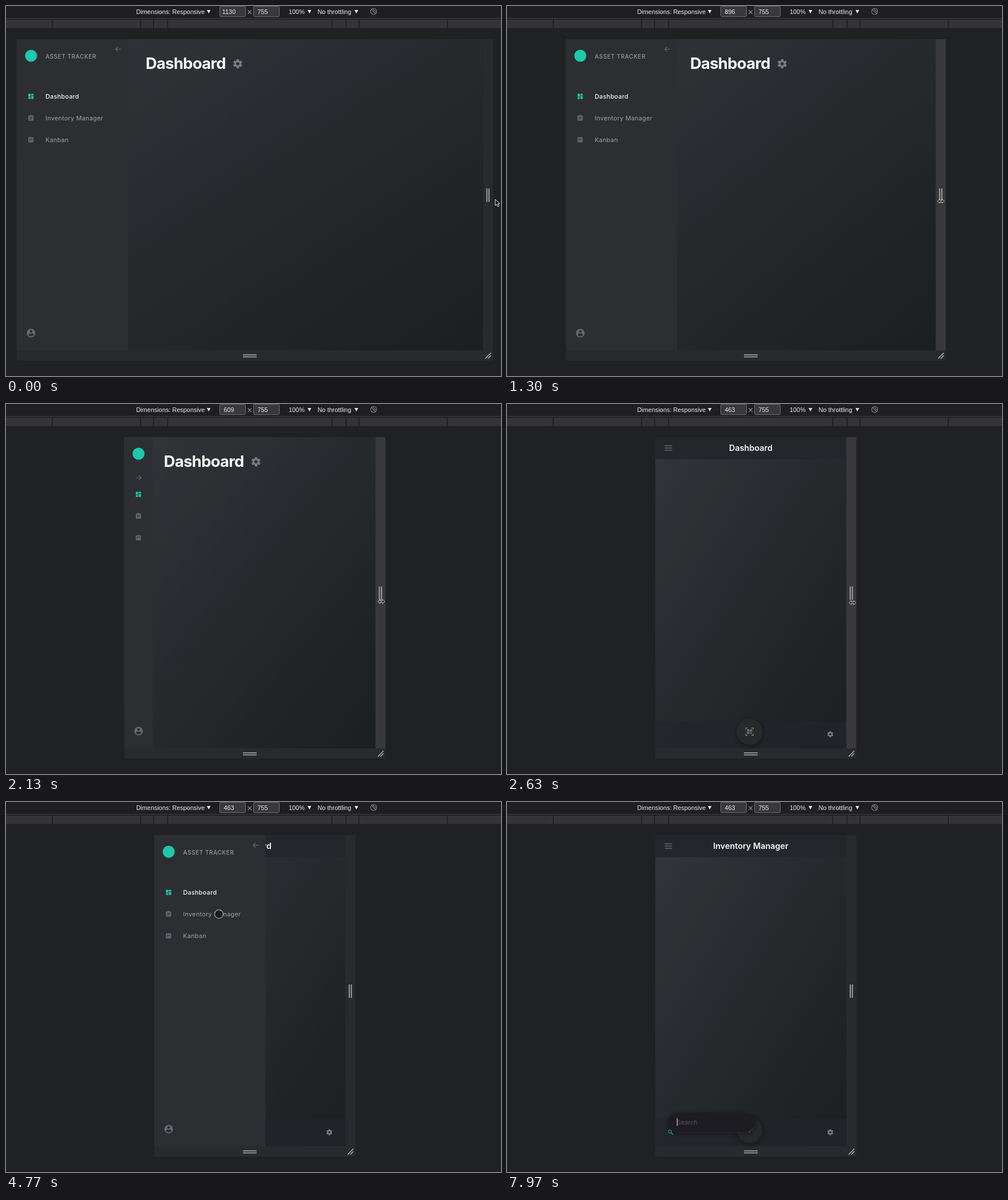
These frames come from a looping animation (865 px wide and 647 px high, 8 s). An HTML page:

```html
<!DOCTYPE html>
<html lang="en">
<head>
<meta charset="utf-8">
<title>Responsive dashboard</title>
<style>
html, body { margin: 0; width: 100%; height: 100%; overflow: hidden; background: #202123; }
svg { display: block; }
text { font-family: Inter, sans-serif; }
.tool text { font: 10.9px "Liberation Sans", Arial, sans-serif; fill: #e9eaec; }
.tool .num { text-anchor: middle; }
.item { font-size: 10.8px; letter-spacing: .28px; fill: #a1a1a5; }
.active { font-weight: 500; fill: #f4f4f5; }
.brand { font-size: 10.1px; font-weight: 500; letter-spacing: .5px; fill: #97979b; }
.title { font-size: 27.5px; font-weight: 700; letter-spacing: -.75px; fill: #f4f5f5; }
.bar { font-size: 14.4px; font-weight: 600; fill: #f6f6f7; text-anchor: middle; }
.hint { font-size: 10.8px; fill: #55575c; }
.line { fill: none; stroke-width: 1.1; }
.cut { fill: none; stroke: #2d2e32; stroke-width: 2; }
.hole { fill: #2d2e32; }
</style>
</head>
<body>
<svg id="stage" width="865" height="647" viewBox="0 0 865 647"></svg>
<script>
const LOOP = 8000, MID = 426, SCALE = 0.7213, TOP = 58, BOTTOM = 602, TALL = BOTTOM - TOP;
const OPEN = 194.5, SLIM = 50, HANDLE = 17.5;
const TABLET = 768, PHONE = 600;
const GREY = '#686873', TEAL = '#1cc9a9', PALE = '#aeaeb0', DIM = '#85858d';

const rect = (x, y, w, h, fill, more = '') =>
  `<rect x="${x}" y="${y}" width="${w}" height="${h}" fill="${fill}" ${more}/>`;
const text = (x, y, label, cls = '', more = '') =>
  `<text x="${x}" y="${y}" class="${cls}" ${more}>${label}</text>`;
const line = (d, color, more = '') => `<path class="line" d="${d}" stroke="${color}" ${more}/>`;
const box = (x, y, w, h, r = 0) => rect(x, y, w, h, 'currentColor', `rx="${r}"`);
const cut = d => `<path class="cut" d="${d}"/>`;

// Icons live in a 24-unit square centred on the origin
const ICONS = {
  board: box(-9, -9, 8, 10) + box(-9, 3, 8, 6) + box(1, -1, 8, 10) + box(1, -9, 8, 6),
  list: box(-9, -9, 18, 18, 2) + box(-3, -11, 6, 4, 2) + cut('M-5-4h10M-5 0h10M-5 4h7'),
  kanban: box(-9, -9, 18, 18, 2) + cut('M-4-5v10M0-5v5M4-5v8'),
  user: `<circle r="10" fill="currentColor"/><circle class="hole" cy="-4" r="3"/>
    <ellipse class="hole" cy="4" rx="6" ry="3.2"/>`,
  search: '<path d="M2 2l6 6" stroke="currentColor" stroke-width="2.4"/>' +
    '<circle cx="-2.5" cy="-2.5" r="5.5" fill="none" stroke="currentColor" stroke-width="2"/>',
  gear: '<g stroke="currentColor" fill="none"><circle r="5.3" stroke-width="3.8"/>' +
    Array.from({ length: 6 }, (_, i) =>
      `<path d="M0-6v-3.7" stroke-width="5" transform="rotate(${i * 60})"/>`).join('') + '</g>'
};
const icon = (name, x, y, size, color = GREY, more = '') =>
  `<g transform="translate(${x} ${y}) scale(${size / 24})" color="${color}" ${more}>${ICONS[name]}</g>`;

const caret = x => `<path d="M${x} 7h6.5l-3.25 6z" fill="#e9eaec"/>`;
const field = (x, label, more = '') => rect(x, .5, 45, 18, '#39393b', 'rx="2" stroke="#707073"') +
  text(x + 16, 13.5, label, 'num', more);
const ticks = [143.5, 168.3, 190.8, 345.2].flatMap(d => [MID - d, MID + d]);

const toolbar = `<g class="tool">
  ${rect(0, 0, 865, 21, '#1f1f21')}${rect(0, 21, 865, 1, '#414143')}${rect(0, 24, 865, 14.5, '#343436')}
  ${ticks.map(x => rect(x - .7, 24, 1.4, 14.5, '#19191b')).join('')}
  ${text(227.5, 13.5, 'Dimensions: Responsive')}${caret(351)}
  ${field(373.5, '', 'id="width"')}${field(432.5, '755')}
  ${line('M422.5 7.5l6.5 6.5m0-6.5l-6.5 6.5', '#8d8d90')}
  ${text(494, 13.5, '100%')}${caret(527)}
  ${text(544.5, 13.5, 'No throttling')}${caret(609)}
  <circle class="line" cx="642.5" cy="9.5" r="5.3" stroke="#7d7d80"/>
  ${line('M638.5 6l7.5 7.5M641 5l5.5 5.5', '#7d7d80')}
</g>`;

const entry = (name, label, y, cls, color) => icon(name, 25, y, 12, color) +
  text(50.5, y + 4, label, 'item label ' + cls);

const sidebar = `<g id="side">
  <rect id="panel" y="${TOP}" height="${TALL}" fill="#2d2e32"/>
  <circle cx="25.3" cy="87" r="10.5" fill="${TEAL}"/>
  ${text(50.5, 91.6, 'ASSET TRACKER', 'brand label')}
  ${entry('board', 'Dashboard', 158, 'active', TEAL)}
  ${entry('list', 'Inventory Manager', 196)}
  ${entry('kanban', 'Kanban', 234)}
  ${icon('user', 25.3, 572, 18)}
  ${line('M183 75.5h-10m4-4l-4 4 4 4', GREY, 'id="fold"')}
  ${line('M20 129h10m-4-4l4 4-4 4', GREY, 'id="expand"')}
</g>`;

const corners = [0, 90, 180, 270].map(a =>
  `<path d="M-6.5-3.5v-3h3" transform="rotate(${a})"/>`).join('');

const mobile = `<g id="mobile">
  <rect id="head" y="${TOP}" height="38.5" fill="#23272b"/>
  ${line('M16.5 73h13m-13 4h13m-13 4h13', DIM)}
  ${text(0, 82.3, '', 'bar', 'id="barTitle"')}
  <rect id="foot" y="554" height="48" fill="#22252a" fill-opacity=".75"/>
  ${icon('search', 27, 577.5, 12, DIM, 'id="lens"')}
  <g id="fab">
    <circle r="22.5" fill="#25292c" filter="url(#shade)"/>
    <g id="scan" class="line" stroke="#8f8f96">${corners}
      <path d="M-3.5-3.5h2.5v2.5h-2.5zM1.5-3.5h2.5v2.5h-2.5zM-3.5 1h2.5v2.5h-2.5zM1 1.5h3M2 3.5h2"/></g>
    ${line('M-5 0h10M0-5v10', '#8f8f96', 'id="plus"')}
  </g>
  <g id="options">${icon('gear', 0, 0, 13, '#7b7b87')}</g>
  <g id="search">
    ${rect(22, 543, 152.5, 34, '#1d1f22', 'rx="17" filter="url(#shade)"')}
    ${text(38, 563.6, 'Search', 'hint')}
    ${rect(37.8, 553, 1, 13.5, '#e4e4e6', 'id="caret"')}
  </g>
</g>`;

const shades = ['#34353a', '#2d2f33', '#262a2d', '#212427', '#1b1f1f'];

stage.innerHTML = `<defs>
  <linearGradient id="glow" x2="1" y2="1">
    ${shades.map((c, i) => `<stop offset="${i / 4}" stop-color="${c}"/>`).join('')}
  </linearGradient>
  <filter id="shade" x="-40%" y="-60%" width="180%" height="220%">
    <feDropShadow dx="1" dy="2" stdDeviation="4" flood-color="#121416" flood-opacity=".5"/>
  </filter>
</defs>
${rect(0, 0, 865, 647, '#202123')}${toolbar}
<svg id="view" height="${BOTTOM}" overflow="hidden">
  <rect id="main" y="${TOP}" height="${TALL}" fill="url(#glow)"/>
  <g id="heading">${text(0, 109.5, 'Dashboard', 'title')}${icon('gear', 161, 101, 20, '#7b7b87')}</g>
  ${mobile}${sidebar}
</svg>
<rect id="base" y="${BOTTOM}" height="18" fill="#272b2d"/>
${[609.3, 612.8].map(y => rect(414, y, 24, 1.5, PALE)).join('')}
<g id="grip">
  ${rect(0, TOP, HANDLE, TALL, '', 'id="rail"')}
  ${[6, 9.7].map(x => rect(x, 319, 1.7, 23.5, PALE)).join('')}
  ${line('M4 616.5l10-10m-5.5 10l5.5-5.5', PALE, 'style="stroke-width:1.5"')}
</g>
<g id="pointer" fill="#111" stroke="#eee">
  <path id="arrow" d="M0 0v11l2.6-2.3 1.8 4 2-.9-1.8-3.9H8z"/>
  <path id="resize" d="M-6 0l4-3.5v2.3h4v-2.3l4 3.5-4 3.5v-2.3h-4v2.3z" stroke-width=".9"/>
  <circle id="touch" r="7.5" fill-opacity=".85" stroke="#98989b" stroke-width="1.3"/>
</g>`;

const RELEASE = 3850, MENU = 4280, PICK = 5080, FIND = 6970, LEAVE = 7640, HOP = 430;
// Where the hand goes after the drag: start time and destination
const HOPS = [
  { at: RELEASE, x: 282, y: 78 },
  { at: 4300, x: 372, y: 196 },
  { at: PICK, x: 420, y: 161.5 },
  { at: 5870, x: 450, y: 418 },
  { at: 6370, x: 287, y: 577 },
  { at: 7200, x: 638, y: 606 }
];

const $ = id => document.getElementById(id);
const set = (id, attrs) => { for (const k in attrs) $(id).setAttribute(k, attrs[k]); };
const show = (id, on) => { $(id).style.display = on ? '' : 'none'; };
const move = (id, x, y = 0) => set(id, { transform: `translate(${x} ${y})` });
const mix = (a, b, p) => a + (b - a) * p;

// Progress from 0 to 1, slowing down for powers above 1
const glide = (t, from, ms, power = 1) =>
  1 - (1 - Math.min(1, Math.max(0, (t - from) / ms))) ** power;

const labels = document.querySelectorAll('.label');

function draw(t) {
  const reach = glide(t, 30, 240, 2);
  const shrink = glide(t, 685, 2145, 1.18);
  const grow = glide(t, 3370, 330);
  const size = 1130 - 710 * shrink + 44 * grow - (t >= RELEASE);
  const w = size * SCALE, left = MID - w / 2, right = MID + w / 2;
  const phone = size < PHONE, slim = !phone && size < TABLET;
  const inventory = t >= PICK, searching = t >= FIND;

  $('width').textContent = Math.round(size);
  set('view', { x: left, width: w });
  for (const id of ['main', 'head', 'foot']) set(id, { width: w });
  set('base', { x: left, width: w + HANDLE });

  const drawer = glide(t, MENU, 225, 3) - glide(t, PICK, 195, 3);
  const sideW = slim ? Math.max(SLIM, mix(OPEN, SLIM, (TABLET - size) / 60)) : OPEN;
  set('panel', { width: sideW });
  for (const el of labels) el.style.display = slim ? 'none' : '';
  show('fold', !slim);
  show('expand', slim);
  show('side', !phone || drawer > 0);
  move('side', phone ? (drawer - 1) * OPEN : 0);
  show('heading', !phone);
  move('heading', mix(sideW, w, .05));

  show('mobile', phone);
  set('barTitle', { x: w / 2 });
  $('barTitle').textContent = inventory ? 'Inventory Manager' : 'Dashboard';
  move('fab', w / 2 - 2.3, 573);
  move('options', w - 28, 577.5);
  show('scan', !inventory);
  show('plus', inventory);
  show('lens', inventory);
  set('lens', { color: searching ? TEAL : DIM });
  show('search', searching);
  set('search', { opacity: glide(t, FIND, 200, 3) });
  show('caret', (t - FIND) % 1000 < 500);

  const grab = { x: right + 21.5 - 13.5 * reach + 3 * shrink + 3 * grow, y: 338 + 10 * shrink };
  const { x, y } = HOPS.reduce((from, to) => {
    const p = glide(t, to.at, HOP, 1.5);
    return { x: mix(from.x, to.x, p), y: mix(from.y, to.y, p) };
  }, grab);
  const inside = x < right && y < BOTTOM;
  const over = !inside && x < right + HANDLE && y < BOTTOM;
  move('grip', right);
  set('rail', { fill: over ? '#39393b' : '#272b2d' });
  show('pointer', t < LEAVE);
  move('pointer', x, y);
  show('resize', over);
  show('touch', inside);
  show('arrow', !over && !inside);
}

const start = performance.now();
function tick() {
  draw((performance.now() - start) % LOOP);
  requestAnimationFrame(tick);
}
tick();
</script>
</body>
</html>
```
